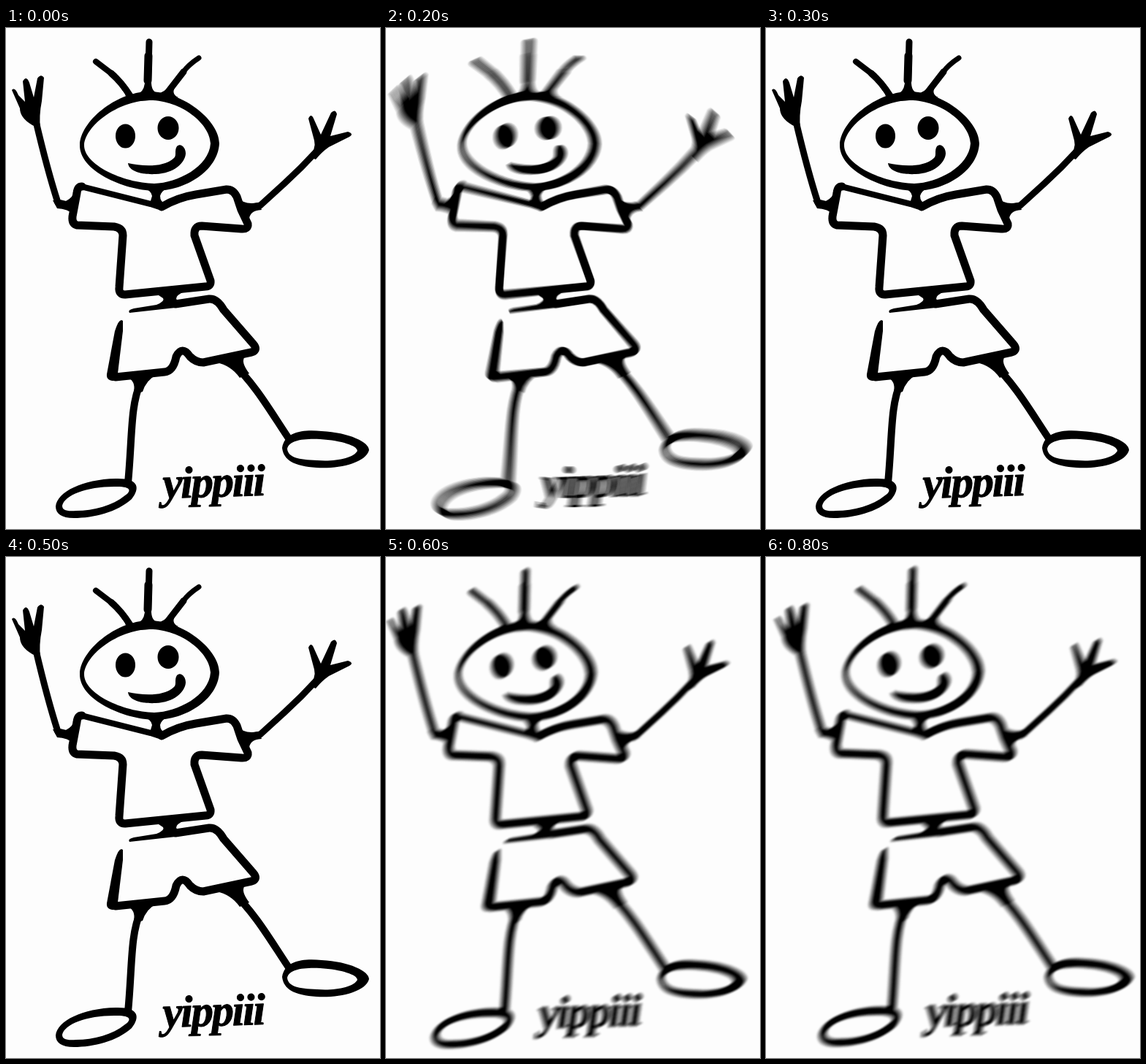
These frames come from a looping animation (512x686 px, 0.9 s). An HTML page with a canvas:

```html
<!DOCTYPE html>
<html lang="en">
<head>
<meta charset="utf-8">
<title>Jumping stick figure</title>
<style>
  html, body { margin: 0; width: 100%; height: 100%; overflow: hidden; background: #fdfdfd; }
  canvas { display: block; }
</style>
</head>
<body>
<canvas id="stage" width="512" height="686"></canvas>
<script>
const W = 512, H = 686, STEP = 100;
const ctx = document.getElementById('stage').getContext('2d');

function makeFigure() {
  const layer = document.createElement('canvas');
  layer.width = W;
  layer.height = H;
  const g = layer.getContext('2d');
  g.lineCap = g.lineJoin = 'round';

  const line = (width, d) => { g.lineWidth = width; g.stroke(new Path2D(d)); };
  const fill = d => g.fill(new Path2D(d));
  const ring = (outer, inner) => g.fill(new Path2D(outer + inner), 'evenodd');
  const dot = (x, y, rx, ry) => {
    g.beginPath();
    g.ellipse(x, y, rx, ry, 0, 0, 2 * Math.PI);
    g.fill();
  };

  // hair
  line(8, 'M123 46 L148 65');
  line(9, 'M144 62 Q158 74 170 93');
  line(9, 'M196 19 L194 92');
  line(11, 'M195 38 L194 72');
  line(7, 'M264 41 Q250 50 242 61');
  line(9, 'M243 60 L219 91');
  fill('M158 84 Q170 92 178 91 Q188 89 190 76 L199 76 Q200 90 211 89 Q222 84 230 74 L234 77 Q224 90 236 95 L195 99 L158 102 Q170 96 158 84Z');

  // head
  ring('M101 160 C102 128 150 88 195 87 C245 87 292 128 292 158 C290 196 245 223 204 223 C160 222 100 195 101 160Z',
       'M107 160 C109 134 152 100 197 99 C240 99 279 131 280 158 C278 190 235 212 203 213 C160 212 106 187 107 160Z');
  dot(163.5, 148, 13.5, 16.5);
  dot(222, 137, 14.5, 16);
  fill('M167 185 C185 189 215 192 230 178 C234 174 230 168 234 162 C239 157 246 163 246 172 C245 185 230 199 205 200 C185 201 168 196 167 185Z');

  // neck and shirt
  fill('M186 218 Q199 222 200 230 L197 240 L214 248 L218 240 Q211 238 211 230 Q212 224 222 218Z');
  line(8, 'M103 217 L198 241 L213 246');
  line(11, 'M213 245 Q235 232 260 228 L302 221 Q311 221 316 231 L322 249 L331 268 Q332 276 322 275 L268 271 Q257 271 258 284 L280 346 Q281 354 273 354 L163 365 Q154 365 155 355 L160 284 Q160 274 148 272 L97 270 Q90 268 91 258 L97 226 Q98 217 104 217');

  // shorts
  fill('M206 364 L246 360 Q232 366 233 371 Q234 374 246 374 L232 383 L205 386 L169 390 Q166 386 175 384 L206 379 Q218 374 215 370Z');
  line(11, 'M232 378 L278 371 Q289 370 298 386 L338 432 Q346 441 336 444 L270 458 Q260 458 252 450 Q241 434 233 450 Q229 470 217 471 L150 478');
  fill('M138 474 L149 415 Q155 396 160 401 L160 415 L153 473 L150 483 Q137 484 138 474Z');

  // arms and hands
  line(9, 'M41 128 C49 162 60 205 71 239 L92 244');
  fill('M64 236 L78 238 Q88 236 93 226 L95 257 Q84 247 70 247Z');
  fill('M8 85 Q12 80 17 92 L26 101 L23 73 Q28 64 32 75 L38 95 L43 69 Q48 62 52 68 L49 100 Q45 120 47 138 L36 133 Q19 123 19 110Z');
  line(9, 'M425 169 Q404 192 382 212 L348 243 L326 247');
  fill('M318 232 Q326 243 346 239 L350 249 Q332 250 333 264Z');
  fill('M414 124 Q418 115 422 126 L431 146 L445 116 Q451 110 453 118 L444 148 L468 142 Q477 145 470 149 L442 163 Q432 170 424 180 L414 176 Q425 166 422 154Z');

  // legs and feet
  line(10, 'M184 486 C170 518 173 560 167 623');
  fill('M168 479 L206 475 Q192 482 187 498 L174 502 Q179 486 168 479Z');
  line(10, 'M310 459 C341 487 364 528 387 562');
  fill('M288 458 L328 449 Q320 456 333 473 L320 479 Q308 462 288 458Z');
  ring('M68 655 C70 635 105 618 150 617 C182 616 184 630 172 645 C152 663 120 671 93 671 C76 671 68 665 68 655Z',
       'M77 654 C80 640 110 628 148 628 C172 627 172 634 163 640 C146 654 120 661 96 661 C82 662 77 660 77 654Z');
  ring('M378 575 C382 551 410 550 432 552 C470 554 497 567 497 578 C492 596 455 604 425 602 C395 600 380 592 378 575Z',
       'M385 576 C388 565 405 562 430 563 C460 565 481 572 481 579 C476 589 450 594 426 592 C400 591 386 588 385 576Z');

  // caption
  g.translate(215, 644);
  g.rotate(-0.03);
  g.font = 'italic bold 61px "Liberation Serif", serif';
  g.letterSpacing = '-2.5px';
  g.lineWidth = 1;
  g.fillText('yippiii', 0, 0);
  g.strokeText('yippiii', 0, 0);
  return layer;
}

const figure = makeFigure();

// Averages many placed copies of the figure; place() receives -1..1.
function smear(copies, softness, place) {
  ctx.globalCompositeOperation = 'lighter';
  ctx.globalAlpha = 1 / copies;
  ctx.filter = softness ? `blur(${softness}px)` : 'none';
  for (let i = 0; i < copies; i++) {
    ctx.save();
    place(2 * i / (copies - 1) - 1);
    ctx.drawImage(figure, 0, 0);
    ctx.restore();
  }
}

const sharp = () => ctx.drawImage(figure, 0, 0);

const spin = degrees => () => smear(17, 0, k => {
  ctx.translate(W / 2, H / 2);
  ctx.rotate(k * degrees * Math.PI / 180);
  ctx.translate(-W / 2, -H / 2);
});

const sway = side => () => smear(13, 1, k =>
  ctx.translate(side * 5 + k * 4.5, -side * 1.2 - k * 2.5));

const poses = [sharp, spin(2.7), spin(1.4), sharp, spin(2.7), sharp, sway(-1), sharp, sway(1)];
let shown = -1;

function draw() {
  const index = Math.floor(performance.now() / STEP) % poses.length;
  if (index !== shown) {
    shown = index;
    ctx.clearRect(0, 0, W, H);
    ctx.save();
    poses[index]();
    ctx.restore();
  }
  requestAnimationFrame(draw);
}
draw();
</script>
</body>
</html>
```
